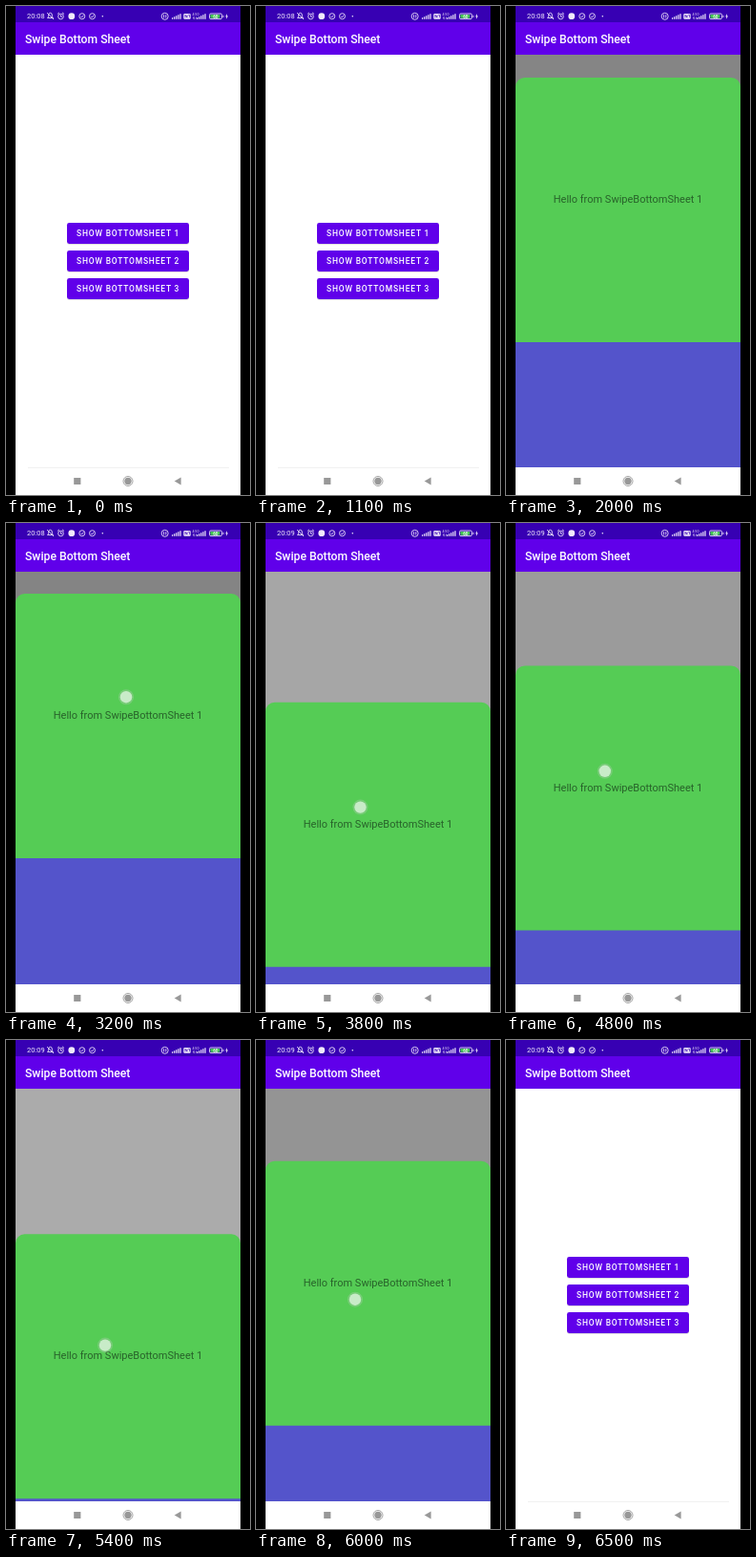
These frames come from a looping animation (256 by 512 pixels, 8000 ms). An HTML page:

```html
<!DOCTYPE html>
<html lang="en">
<head>
<meta charset="utf-8">
<title>Swipe Bottom Sheet</title>
<style>
html, body { margin: 0; width: 100%; height: 100%; overflow: hidden; background: #000; }
svg { display: block; width: 256px; height: 512px; font-family: Roboto, sans-serif; }
.button { font-size: 8.5px; font-weight: 500; letter-spacing: .8px; fill: #fff; }
.line { fill: none; stroke: #e6dcf8; stroke-width: .9; }
</style>
</head>
<body>
<svg viewBox="0 0 256 512">
  <clipPath id="content"><rect x="10" y="51" width="236" height="432"/></clipPath>
  <rect width="256" height="512" fill="#000"/>
  <rect x="10" width="236" height="512" fill="#fff"/>
  <g id="buttons"></g>

  <g clip-path="url(#content)">
    <rect id="dim" x="10" y="50" width="236" height="434"/>
    <g id="sheet">
      <rect x="10" y="270" width="236" height="214" fill="#5454cb"/>
      <path d="M10 277V9.6a9.6 9.6 0 0 1 9.6 -9.6H236.4a9.6 9.6 0 0 1 9.6 9.6V277Z" fill="#55cc55"/>
      <text x="128" y="131" font-size="11" text-anchor="middle" fill="#28622a">Hello from SwipeBottomSheet 1</text>
    </g>
  </g>

  <rect x="10" width="236" height="17" fill="#3700b3"/>
  <rect x="10" y="17" width="236" height="34" fill="#6000ea"/>
  <text x="20" y="39" font-size="12.2" font-weight="500" fill="#fff">Swipe Bottom Sheet</text>

  <!-- status bar -->
  <text id="clock" x="22" y="13.4" font-size="7.5" fill="#f0eafa"></text>
  <g class="line">
    <path d="M43.5 12.5H49.5L48.3 11V9Q48 7.2 46.5 7.2T44.7 9V11ZM43 7L50 14"/>
    <circle cx="57.5" cy="11" r="2.8"/>
    <path d="M57.5 9.3V11.2H59M54 8.5L56 6.8M61 8.5L59 6.8"/>
    <circle cx="79.8" cy="10.7" r="3"/><path d="M78.3 10.7L79.5 11.9L81.7 9.5"/>
    <circle cx="90.5" cy="10.7" r="3"/><path d="M89 10.7L90.2 11.9L92.4 9.5"/>
    <circle cx="166.7" cy="10.8" r="3.5"/>
    <path d="M165.6 9.2V12.4M167.8 9.2V12.4"/>
    <rect x="213.5" y="8" width="13" height="5.6" rx="1.4"/><path d="M228 9.7V12"/>
  </g>
  <g fill="#f0eafa">
    <circle cx="68.8" cy="10.7" r="3.4"/>
    <circle cx="101.3" cy="10.8" r=".8"/>
    <rect x="186.3" y="8" width="7.4" height="5.8" rx="1"/>
    <path d="M188 12.3V9.3L190 12.1V9.3M191.2 9.3H192.6V12.1" fill="none" stroke="#3700b3" stroke-width=".7"/>
    <text x="195.4" y="9.6" font-size="3.6">4.50</text>
    <text x="196" y="13.8" font-size="3.4">K/s</text>
    <path d="M232 8L230.2 11.2H231.3L230.9 13.8L233 10.4H231.8Z"/>
    <g id="bars"></g>
  </g>
  <rect x="214.4" y="8.9" width="10" height="3.8" rx=".6" fill="#43c553"/>
  <text x="219.8" y="12.5" font-size="4.6" font-weight="500" text-anchor="middle" fill="#fff">60</text>

  <!-- navigation bar -->
  <path id="divider" d="M23 483.5H234" stroke="#f0f0f0"/>
  <g fill="#989898">
    <rect x="71.2" y="494" width="7.2" height="7"/>
    <circle cx="128" cy="497.5" r="3.7"/>
    <circle cx="128" cy="497.5" r="5" fill="none" stroke="#989898" stroke-width=".9"/>
    <path d="M176.7 497.5L183.6 493.6V501.4Z"/>
  </g>

  <g id="finger">
    <circle r="8" fill="#c4ccc4" opacity=".3"/>
    <circle r="6.2" fill="#fff" opacity=".6"/>
  </g>
</svg>
<script>
const LOOP = 8000, STEP = 100, CLOSED = 484, OPEN = 75;
const GRAB = 3200, RELEASE = 6000, GONE = 6500;
const $ = id => document.getElementById(id);

$('buttons').innerHTML = [1, 2, 3].map(n => {
  const y = 198 + 29 * n;
  return `<rect x="64" y="${y + .8}" width="128" height="22" rx="2.4" fill="#000" opacity=".16"/>
    <rect x="64" y="${y}" width="128" height="22" rx="2.4" fill="#6000ea"/>
    <text class="button" x="74" y="${y + 14.2}">SHOW BOTTOMSHEET ${n}</text>`;
}).join('');

$('bars').innerHTML = [174, 200].map(x => [0, 1, 2, 3, 4].map(i =>
  `<rect x="${x + i * 2.1}" y="${12.2 - i}" width="1.2" height="${1.6 + i}"/>`).join('')).join('');

const mix = (a, b, u) => a + (b - a) * u;
const clamp = u => Math.min(1, Math.max(0, u));
const ramp = (t, start, span) => {
  const u = clamp((t - start) / span);
  return u * u * (3 - 2 * u);
};

// Swings up and down around a slowly rising centre, then slides out below
function drag(t, start, grip, leave) {
  const swing = 167 - .008 * (t - 4500) + 44 * Math.cos(2 * Math.PI * (t - 4525) / 900);
  const held = mix(start, swing + grip, ramp(t, GRAB, 600));
  return mix(held, CLOSED + grip, ramp(t, leave, 500));
}

function sheetTop(t) {
  if (t >= GRAB) return drag(t, 74, 0, RELEASE);
  return mix(CLOSED, OPEN, 1 - (1 - clamp((t - 1450) / 550)) ** 3);
}

function draw(now) {
  const t = Math.floor(now % LOOP / STEP) * STEP;
  const top = sheetTop(t);
  $('sheet').setAttribute('transform', `translate(0 ${top})`);
  $('dim').setAttribute('opacity', .48 * (CLOSED - top) / (CLOSED - OPEN));
  $('divider').setAttribute('opacity', top < CLOSED ? 0 : 1);
  $('clock').textContent = t < 3600 ? '20:08' : '20:09';

  // The finger runs slightly ahead of the sheet
  const x = mix(126, 100.5, ramp(t, GRAB, 1000)) + 3.5 * ramp(t, 4200, 700);
  const y = drag(t + 20, 182, 116, RELEASE - 60);
  $('finger').setAttribute('transform', `translate(${x} ${y})`);
  $('finger').setAttribute('opacity', t >= GRAB && t < GONE - 300 ? 1 : 0);
}

const start = performance.now();
function tick() {
  draw(performance.now() - start);
  requestAnimationFrame(tick);
}
tick();
</script>
</body>
</html>
```
